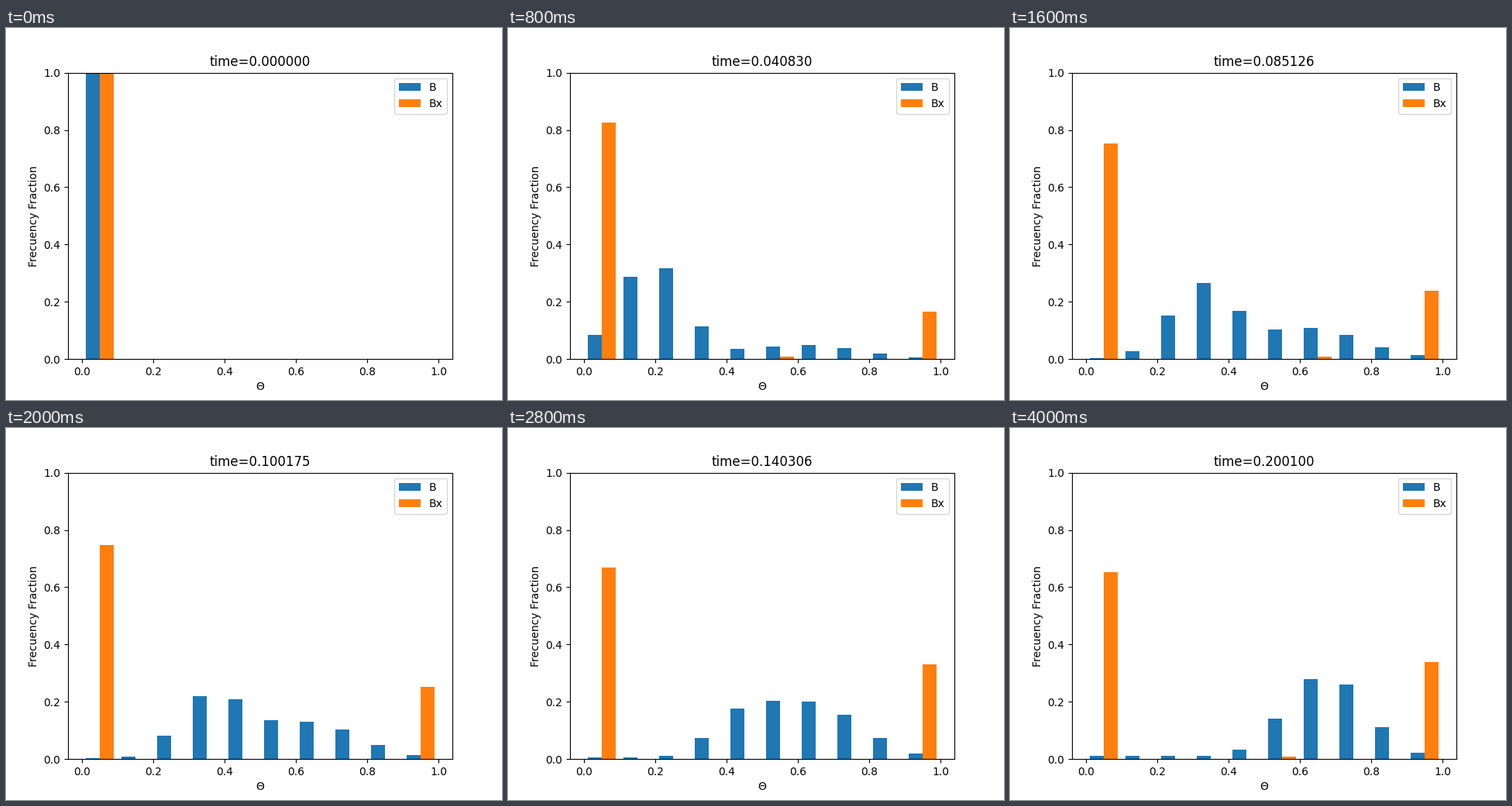
A matplotlib script that plays this animation: 640 px wide and 480 px high, repeating every 4.2 s.

```python
import math
import random

import matplotlib.pyplot as plt
import numpy as np
from matplotlib.animation import FuncAnimation

FRAMES, INTERVAL = 21, 200
BINS, WIDTH = 10, 0.04
END_TIME = 0.2001
SPECK = 0.0085  # share of a single sample

# Key points: step, simulated time, share of Bx in the last bin.
KEYS = [(0, 0, 0), (4, 0.040830, 0.1655), (6, 0.070077, 0.2275),
        (10, 0.100175, 0.252), (14, 0.140306, 0.3305),
        (17, 0.170297, 0.370), (20, END_TIME, 0.339)]
KEY_STEPS, KEY_TIMES, KEY_LAST = zip(*KEYS)


def clock(step):
    return np.interp(step, KEY_STEPS, KEY_TIMES)


def bell(mean, sigma):
    """Mass of a normal distribution in each bin, low tail in the first."""
    edges = np.arange(BINS + 1) / BINS
    below = [0.5 + 0.5 * math.erf((e - mean) / (sigma * 2 ** 0.5)) for e in edges]
    below[0] = 0
    return np.diff(below)


def b_heights(step):
    """A front leaves the first bin and feeds a settled hump near 0.69."""
    s = clock(step) / END_TIME
    front = bell(0.05 + 0.85 * s - 0.38 * s * s, 0.001 + 0.085 * min(1, 5 * s))
    hump = bell(0.62 + 0.07 * s, 0.17 - 0.06 * s)
    heights = (1 - s) * front + 0.85 * s ** 0.9 * hump
    return np.maximum(heights, 0.011 * s * s)


def bx_heights(step):
    """Two-state switching: nearly all samples sit in the outer bins."""
    rng = random.Random(step)
    specks = rng.sample(range(1, BINS - 1), rng.randint(0, min(step, 3)))
    heights = np.zeros(BINS)
    heights[specks] = SPECK
    heights[-1] = np.interp(step, KEY_STEPS, KEY_LAST)
    heights[0] = 1 - heights.sum()
    return heights


fig, ax = plt.subplots(figsize=(6.4, 4.8), dpi=100)
left = np.arange(BINS) / BINS + 0.01
b_bars = ax.bar(left, 0, WIDTH, align="edge", color="C0", label="B")
bx_bars = ax.bar(left + WIDTH, 0, WIDTH, align="edge", color="C1", label="Bx")
ax.set_xlim(-0.039, 1.039)
ax.set_ylim(0, 1)
ax.set_xlabel(r"$\Theta$")
ax.set_ylabel("Frecuency Fraction")
ax.legend(loc="upper right")
title = ax.set_title("")


def update(step):
    for bars, heights in ((b_bars, b_heights(step)), (bx_bars, bx_heights(step))):
        for bar, height in zip(bars, heights):
            bar.set_height(height)
    title.set_text(f"time={clock(step):.6f}")
    return [*b_bars, *bx_bars, title]


anim = FuncAnimation(fig, update, frames=FRAMES, interval=INTERVAL,
                     repeat=True, repeat_delay=0, blit=False)
plt.show()
```
